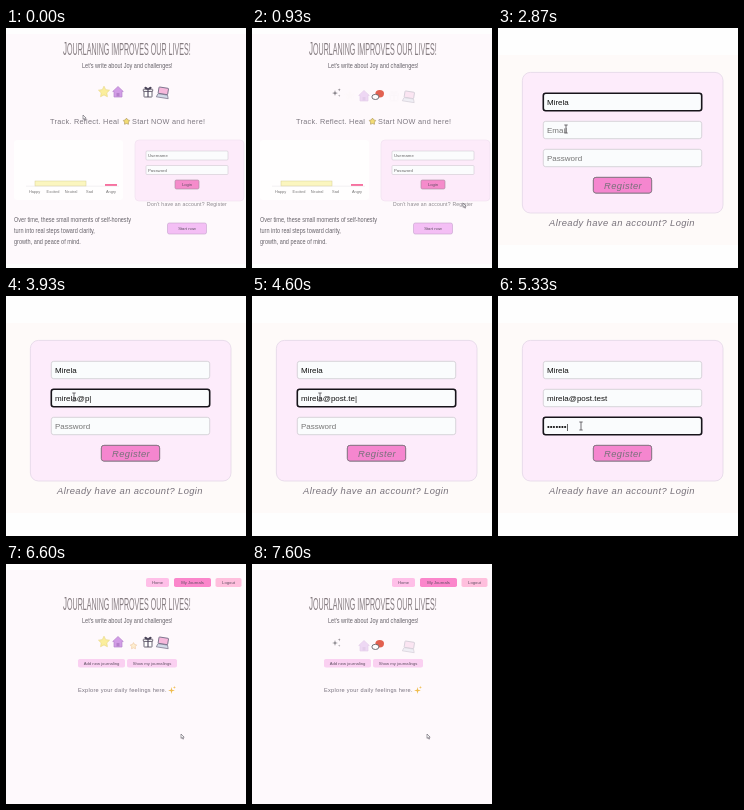
An HTML page that plays this animation: 240x240 px, repeating every 7.67 s.

```html
<!DOCTYPE html>
<html lang="en">
<head>
<meta charset="utf-8">
<title>Journal sign-up</title>
<style>
html, body { margin: 0; width: 100%; height: 100%; overflow: hidden; background: #fefefe; }
svg { display: block; width: 100vw; height: 100vh; }
text { font-family: "Liberation Sans", Arial, sans-serif; white-space: pre; }
.mid { text-anchor: middle; }
.title { font-size: 16px; fill: #857c80; }
.hand { font-size: 7.6px; fill: #67636a; }
.lead { font-size: 7.3px; letter-spacing: .27px; fill: #7d7880; }
.explore { font-size: 5.6px; letter-spacing: .28px; fill: #78727e; }
.tiny { font-size: 4.2px; fill: #5d4e60; }
.hint { font-size: 4.3px; fill: #666; }
.link { font-size: 5.1px; letter-spacing: .2px; fill: #89848a; }
.axis { font-size: 3.9px; fill: #777; }
.field { font-size: 8px; fill: #757575; }
.typed { fill: #111; }
.big { font-size: 9.4px; letter-spacing: .4px; font-style: italic; fill: #77717a; }
</style>
</head>
<body>
<svg id="stage" viewBox="0 0 240 240" preserveAspectRatio="none"></svg>
<script>
const LOOP = 7670;
const USER = "Mirela";
const EMAIL = "mirela@post.test";
const PAGE = "#fef9fc";
const stage = document.getElementById("stage");

const clamp = v => Math.max(0, Math.min(1, v));
const ramp = (t, a, b) => clamp((t - a) / (b - a));
const ease = p => p * p * (3 - 2 * p);

const text = (x, y, s, cls) => `<text x="${x}" y="${y}" class="${cls}">${s}</text>`;
const narrow = (x, y, s, cls, k) =>
  `<text transform="translate(${x} ${y}) scale(${k} 1)" class="${cls}">${s}</text>`;
const box = (x, y, w, h, r, fill, line = "none", sw = .6) =>
  `<rect x="${x}" y="${y}" width="${w}" height="${h}" rx="${r}" fill="${fill}" stroke="${line}" stroke-width="${sw}"/>`;
const path = (d, fill, line = "none", sw = .7) =>
  `<path d="${d}" fill="${fill}" stroke="${line}" stroke-width="${sw}" stroke-linejoin="round"/>`;
const pill = (x, y, w, h, s, fill, line) =>
  box(x, y, w, h, 1.8, fill, line) + text(x + w / 2, y + h / 2 + 1.5, s, "tiny mid");

function star(r, points, inner) {
  let d = "";
  for (let i = 0; i < points * 2; i++) {
    const a = Math.PI * i / points - Math.PI / 2;
    const q = i % 2 ? r * inner : r;
    d += `${i ? "L" : "M"}${(q * Math.cos(a)).toFixed(2)} ${(q * Math.sin(a)).toFixed(2)}`;
  }
  return d + "Z";
}

const sparkle = (r, color) => path(star(r, 4, .28), color);
const place = (x, y, body) => `<g transform="translate(${x} ${y})">${body}</g>`;

const icons = {
  sparkles: sparkle(3, "#77737a") + place(4.2, -3.2, sparkle(1.6, "#77737a")) +
    place(4.2, 2.8, sparkle(1.3, "#99959c")),
  star: path(star(5.8, 5, .5), "#fbee9c", "#e8d98a"),
  house: path("M-5.3 -.5L0 -5.5L5.3 -.5H4V5H-4V-.5Z", "#d29ce6", "#b685cc") +
    box(-1.5, 1, 3, 3.5, .3, "#b580cb"),
  bubble: `<ellipse cx="1.7" cy="-1.3" rx="4.3" ry="3.7" fill="#e2604f"/>
    <ellipse cx="-2.6" cy="1.9" rx="3.5" ry="2.6" fill="#fff" stroke="#55525a" stroke-width=".8"/>`,
  spark: path(star(3.4, 5, .55), "#fdeed0", "#efc59c", .6),
  gift: box(-4, -1, 8, 6, .4, "#fff", "#5d5666", .9) + box(-4.7, -2.8, 9.4, 2.2, .4, "#fff", "#5d5666", .9) +
    path("M0 -2.8V5M0 -2.8C-5 -3 -3 -7 0 -2.8C3 -7 5 -3 0 -2.8", "none", "#4b4459", 1.1),
  laptop: `<g transform="rotate(9)">` + box(-4.8, -5.4, 9.6, 6.4, .6, "#f6b9dc", "#79718a", .9) +
    path("M-4.8 1.4H4.8L6 4.8H-6Z", "#d3dbe8", "#79718a", .7) + `</g>`
};

function iconRow(y, phase, journals) {
  const wave = .5 + .5 * Math.cos(2 * Math.PI * phase / 2000);
  const row = [
    ["sparkles", 83, 1 - wave, 0, 1],
    ["star", 98, wave, 0],
    ["house", 112, wave, .35],
    ["bubble", 126, 1 - wave, 0, 3],
    ["gift", 142, wave, 0],
    ["laptop", 157, wave, .3, 1]
  ];
  if (journals) row.push(["spark", 127.5, wave, 0, 4]);
  return row.map(([name, x, a, low, drop = 0]) =>
    `<g opacity="${low + (1 - low) * a}" transform="translate(${x} ${y + drop + 4 * (1 - a)})">${icons[name]}</g>`
  ).join("");
}

const heading = y =>
  narrow(57, y, `<tspan font-size="18">J</tspan>OURLANING IMPROVES OUR LIVES!`, "title", .445) +
  narrow(76, y + 13.2, "Let's write about Joy and challenges!", "hand", .73);

function homePage(t) {
  const axis = [["Happy", 28.5], ["Excited", 47], ["Neutral", 65], ["Sad", 83.5], ["Angry", 105]];
  const body = ["Over time, these small moments of self-honesty",
    "turn into real steps toward clarity,", "growth, and peace of mind."];
  return box(0, 6, 240, 230, 0, PAGE) + heading(26.5) + iconRow(64, t, false) +
    text(44, 96, "Track. Reflect. Heal", "lead") +
    place(120.5, 93.5, path(star(3.4, 5, .6), "#f3dc74", "#a8935c", .6)) +
    text(126, 96, "Start NOW and here!", "lead") +
    box(8, 112, 109, 60, 3, "#fffefe") +
    box(29, 153, 51, 5, 0, "#fbf6bf", "#d8d093", .5) +
    box(99, 156, 12, 2, 0, "#f7719f") +
    path("M20 158.2H113", "none", "#dddadd", .4) +
    axis.map(([s, x]) => text(x, 164.6, s, "axis mid")).join("") +
    box(129, 112, 109, 61, 4, "#fdebfa", "#eedfee") +
    box(140, 123, 82, 9, 1, "#fbfcfd", "#c6c0c8", .5) + text(142, 129.2, "Username", "hint") +
    box(140, 137.5, 82, 9, 1, "#fbfcfd", "#c6c0c8", .5) + text(142, 143.7, "Password", "hint") +
    box(169, 152, 24, 9, 1.4, "#f58bcb", "#a38a9d") + text(181, 158.4, "Login", "tiny mid") +
    text(141, 178, "Don't have an account? Register", "link") +
    body.map((s, i) => narrow(8, 193.5 + 11 * i, s, "hand", .73)).join("") +
    pill(161.5, 195, 39, 11, "Start now", "#f4bff5", "#c3a2cc");
}

const typedCount = (t, start, pace, max) =>
  Math.max(0, Math.min(max, Math.floor((t - start) / pace)));

const fields = [
  { y: 65, hint: "Username", value: USER, from: 2160, to: 2950, start: 2170, pace: 65 },
  { y: 93, hint: "Email", value: EMAIL, from: 2950, to: 4930, start: 3010, pace: 109 },
  { y: 121, hint: "Password", value: "•••••••", from: 4930, to: 5880, start: 4960, pace: 48 }
];

function fieldBox(f, t) {
  const n = typedCount(t, f.start, f.pace, f.value.length);
  const focus = t >= f.from && t < f.to;
  const last = n === f.value.length ? f.start + n * f.pace : t;
  const caret = focus && (t - last) % 600 < 260;
  const label = n ? f.value.slice(0, n) + (caret ? "|" : "") : f.hint;
  return box(45.3, f.y + .3, 158.4, 17.4, 2.4, "#fafcfd", focus ? "#17141a" : "#c9c6cc", focus ? 1.6 : .7) +
    text(49, f.y + 12, label, n ? "field typed" : "field") +
    (caret && !n ? path(`M49 ${f.y + 4}v10`, "none", "#111", .6) : "");
}

function registerPage(t) {
  const ready = ramp(t, 1870, 2130);
  return box(0, 27, 240, 190, 0, "#fefaf9") +
    box(24.4, 44.4, 200.6, 140.6, 8, "#fdecfb", "#e4d7e7", .8) +
    fields.map(f => fieldBox(f, t)).join("") +
    box(95.4, 149.4, 58.2, 15.6, 2.5, "#fbe3f8", "#6d6570", .9) +
    `<g opacity="${ready}">${box(95.4, 149.4, 58.2, 15.6, 2.5, "#f586cf", "#8a7886", .9)}</g>` +
    text(106, 160.8, "Register", "big") +
    `<g opacity="${1 - ready}">${box(42, 185.5, 164, 17.5, 2, "#fcf3fd", "#e6dcea")}</g>` +
    text(51, 198, "Already have an account? Login", "big");
}

function journalPage(t) {
  return box(0, 6, 240, 234, 0, PAGE) +
    pill(140, 14, 23, 9, "Home", "#ffbfe8") +
    pill(168, 14, 37, 9, "My Journals", "#fb86cb") +
    pill(209.5, 14, 26, 9, "Logout", "#ffbfdd") +
    heading(45.5) + iconRow(78, t - 6600, true) +
    pill(72, 95, 47, 8.5, "Add new journaling", "#fad0f1") +
    pill(121, 95, 50, 8.5, "Show my journalings", "#fad0f1") +
    text(72, 128.3, "Explore your daily feelings here.", "explore") +
    place(165.5, 126.5, sparkle(3.4, "#efbd4e")) + place(168.4, 123.4, sparkle(1.6, "#efbd4e"));
}

const HOME_END = 1200;
const FORM_END = 6070;

// time, x, y of the pointer tip or the text beam's centre
const route = [
  [0, 77, 87], [200, 77, 87], [900, 211, 175], [1200, 211, 175],
  [1201, 150, 180], [1830, 76, 128], [1900, 76, 128], [2120, 68, 75],
  [2500, 68, 75], [2800, 68, 101], [4600, 68, 101], [4880, 83, 130],
  [5400, 83, 130], [5750, 125, 157], [6070, 125, 157], [6500, 175, 170], [LOOP, 175, 170]
];

function pointerAt(t) {
  const i = Math.max(1, route.findIndex(p => p[0] > t));
  const [a, b] = [route[i - 1], route[i]];
  const p = ease(ramp(t, a[0], b[0]));
  return [a[1] + (b[1] - a[1]) * p, a[2] + (b[2] - a[2]) * p];
}

function pointer(t) {
  const [x, y] = pointerAt(t);
  const form = t >= HOME_END && t < FORM_END;
  const beam = form && x > 45 && x < 204 && fields.some(f => y >= f.y && y <= f.y + 18);
  if (beam) return place(x, y, path("M-1.7 -4H1.7M0 -4V4M-1.7 4H1.7", "none", "#4c4a50", .8));
  const k = form ? 1.5 : 1;
  return `<g transform="translate(${x} ${y}) scale(${k})">` +
    path("M0 0V4.4L1.1 3.5L1.9 5.2L2.6 4.9L1.8 3.2H3.2Z", "#fff", "#605b66", .6) + `</g>`;
}

function draw(t) {
  const page = t < HOME_END ? homePage : t < FORM_END ? registerPage : journalPage;
  stage.innerHTML = box(0, 0, 240, 240, 0, "#fefefe") + page(t) + pointer(t);
}

function tick() {
  draw(performance.now() % LOOP);
  requestAnimationFrame(tick);
}
tick();
</script>
</body>
</html>
```
